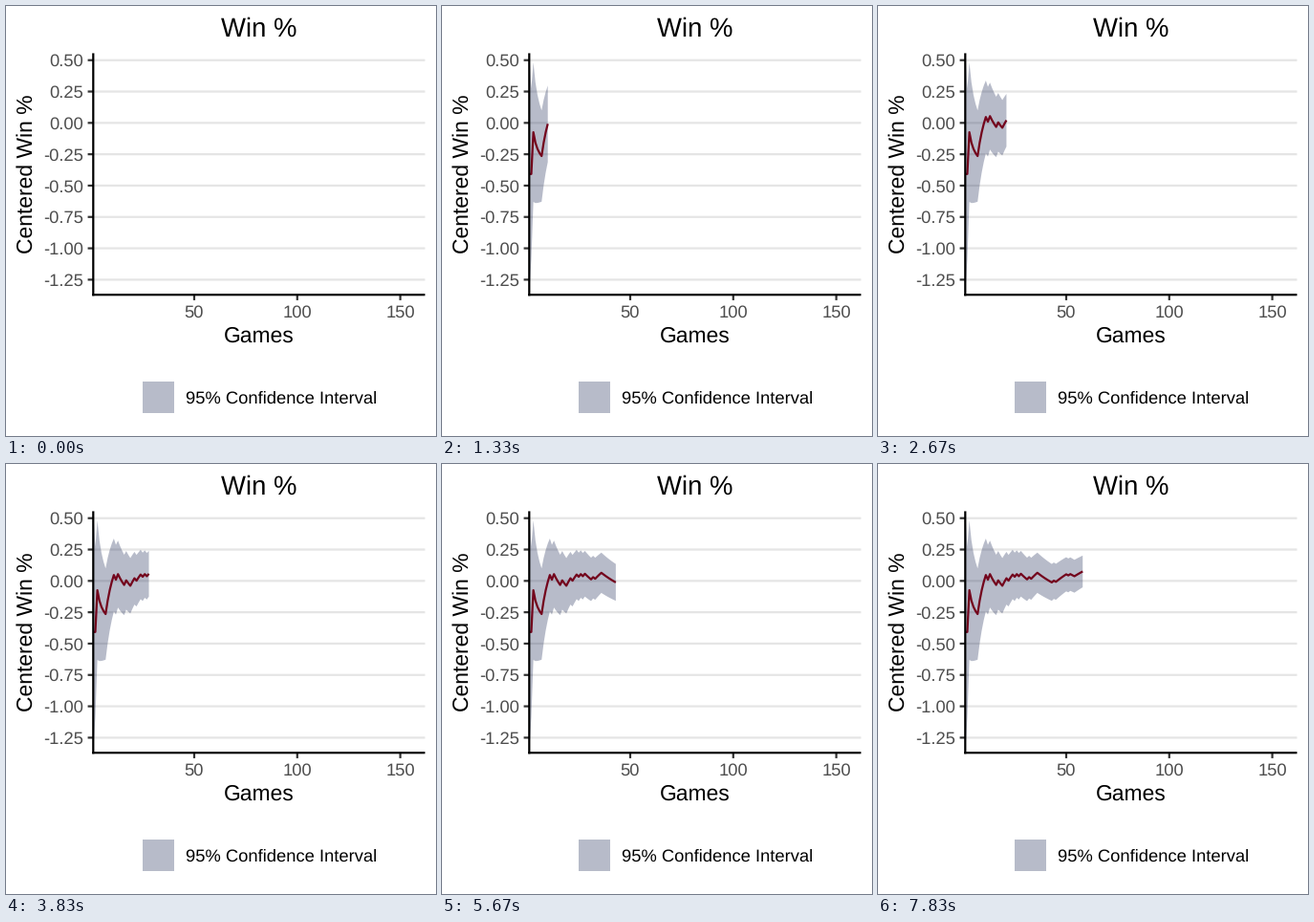
A matplotlib script for the animation above (8 s loop, 450 by 450 pixels).

```python
import numpy as np
import matplotlib.pyplot as plt
from matplotlib.animation import FuncAnimation
from matplotlib.patches import Polygon, Rectangle

plt.rcParams.update({
    "font.family": "Liberation Sans",
    "text.hinting": "none",
    "path.snap": False,
})

SIZE, DPI = 450, 100
FRAMES, LOOP_MS = 48, 8000
LEFT, RIGHT, TOP, BOTTOM = 91.3, 438.5, 49.4, 302.2
STROKE = 2.22 * 72 / DPI
NAVY, MAROON = "#13204f", "#73041c"

# Season model: running win rate minus the final rate, with a normal interval.
SEASON = 162
RATE = 66 / SEASON
RESULTS = "LLWLLLLWWWWLWLLLWLLWWLWWLWLWLLLWLWWWLLLLLLLWLWWWWWLWLLWWWWL"
games = np.arange(1, len(RESULTS) + 1)
wins = np.cumsum([r == "W" for r in RESULTS])
centered = wins / games - RATE
margin = 1.96 * np.sqrt(RATE * (1 - RATE) / games)
y_max = margin[0] - RATE
y_min = -margin[0] - RATE


def px(game):
    return LEFT + (game - 1) * (RIGHT - LEFT) / (SEASON - 1)


def py(value):
    return BOTTOM - (value - y_min) * (BOTTOM - TOP) / (y_max - y_min)


fig = plt.figure(figsize=(SIZE / DPI, SIZE / DPI), dpi=DPI, facecolor="white")
ax = fig.add_axes([0, 0, 1, 1])
ax.set(xlim=(0, SIZE), ylim=(SIZE, 0))
ax.axis("off")


def stroke(xs, ys, color, z):
    return ax.plot(xs, ys, color=color, lw=STROKE, zorder=z, snap=False,
                   solid_capstyle="butt", solid_joinstyle="round")[0]


def label(x, y, text, size, color="black", ha="center", **kw):
    ax.text(x, y, text, fontsize=size * 72 / DPI, color=color, ha=ha,
            va="baseline", **kw)


for v in np.arange(-1.25, 0.51, 0.25):
    y = py(v)
    stroke([LEFT, RIGHT], [y, y], "#e5e5e5", 1)
    stroke([LEFT - 5.73, LEFT], [y, y], "#333333", 4)
    label(81, y + 6.5, f"{v:.2f}", 18.33, "#4d4d4d", "right")

for g in (50, 100, 150):
    x = px(g)
    stroke([x, x], [BOTTOM, BOTTOM + 5.73], "#333333", 4)
    label(x, 326, str(g), 18.33, "#4d4d4d")

stroke([LEFT, LEFT], [TOP, BOTTOM + 1.1], "black", 5)
stroke([LEFT - 1.1, RIGHT], [BOTTOM, BOTTOM], "black", 5)

middle = (LEFT + RIGHT) / 2
label(middle, 32, "Win %", 27.5)
label(middle, 352, "Games", 22.92)
label(28, (TOP + BOTTOM) / 2, "Centered Win %", 22.92, rotation=90,
      rotation_mode="anchor")

ax.add_patch(Rectangle((143, 393), 33, 33, color=NAVY, alpha=0.3, lw=0))
label(188.3, 416, "95% Confidence Interval", 18.33, ha="left")

xs = px(games)
mid, high, low = py(centered), py(centered + margin), py(centered - margin)
ribbon = ax.add_patch(Polygon([[LEFT, TOP]], color=NAVY, alpha=0.3, lw=0,
                              zorder=2))
line = stroke([], [], MAROON, 3)


def update(frame):
    n = round(1 + frame * (SEASON - 1) / 130)
    upper = np.column_stack([xs[:n], high[:n]])
    lower = np.column_stack([xs[:n], low[:n]])
    ribbon.set_xy(np.vstack([upper, lower[::-1]]))
    ribbon.set_visible(n > 1)
    line.set_data(xs[:n], mid[:n])
    line.set_visible(n > 1)
    return ribbon, line


anim = FuncAnimation(fig, update, frames=FRAMES, interval=LOOP_MS / FRAMES,
                     init_func=lambda: update(0), repeat=True, repeat_delay=0)
plt.show()
```
